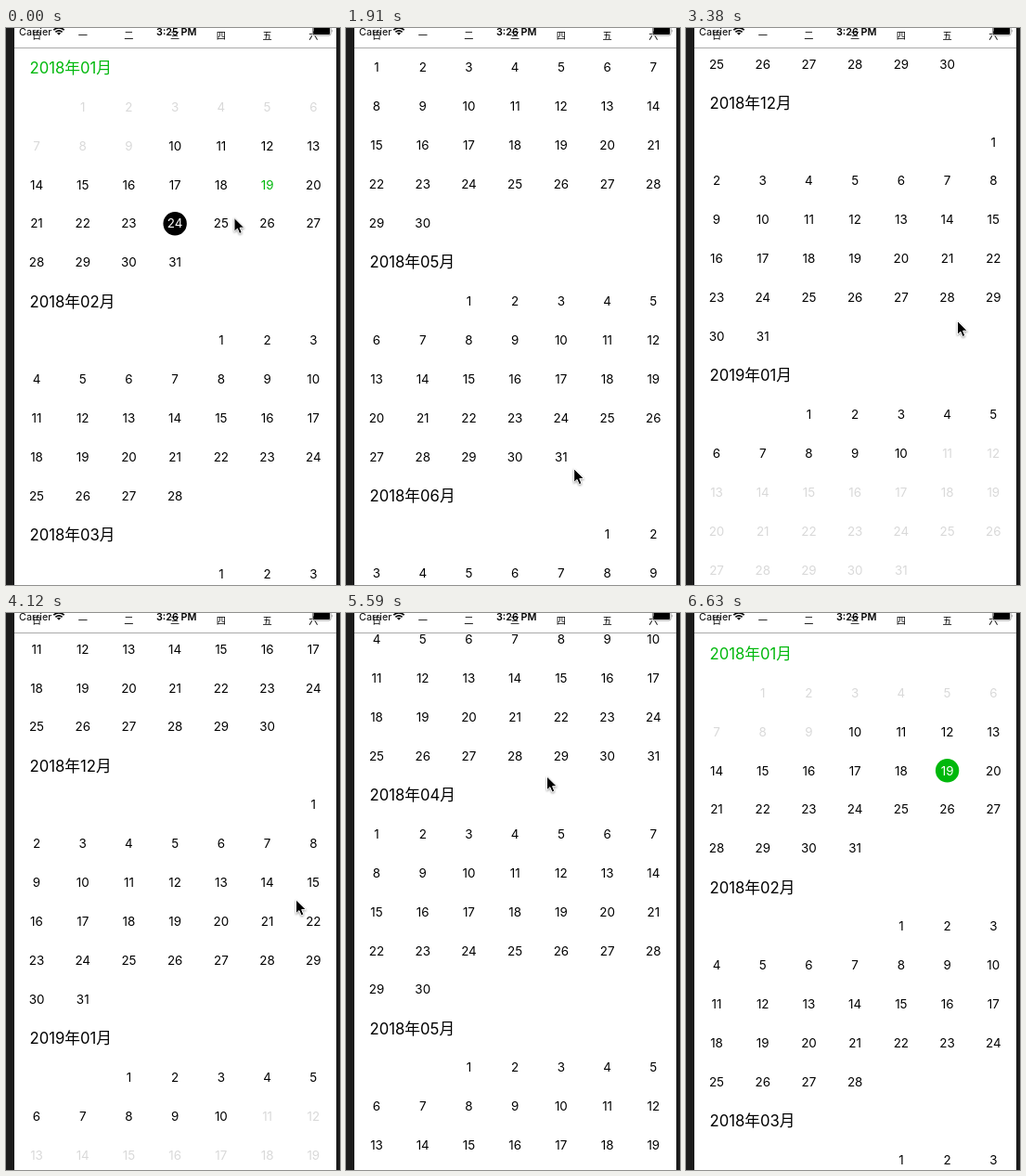
Write an HTML page that moves like this. It is 360x600 px and loops after 6.73 s.

```html
<!DOCTYPE html>
<html lang="zh-CN">
<head>
<meta charset="utf-8">
<title>Calendar</title>
<style>
html, body { margin: 0; width: 100%; height: 100%; overflow: hidden; background: #fff; }
svg { display: block; width: 360px; height: 600px; }
text { font-family: Inter, "Noto Sans CJK SC", "Noto Sans CJK JP", "Noto Sans CJK", sans-serif; fill: #000; }
.day { font-size: 13.4px; text-anchor: middle; }
.month { font-size: 16.7px; }
.week { font-size: 10.2px; text-anchor: middle; }
.bar { font-size: 10.8px; }
.clock { font-weight: 600; text-anchor: middle; }
.off { fill: #d9d9d9; }
.today { fill: #00b80c; }
.on { fill: #fff; }
</style>
</head>
<body>
<svg viewBox="0 0 360 600">
  <defs><clipPath id="clip"><path d="M9 22H356V600H9z"/></clipPath></defs>
  <rect width="360" height="600" fill="#fff"/>
  <g clip-path="url(#clip)"><g id="list"><circle id="dot" r="12.7"/></g></g>
  <path d="M9 21.5H356" stroke="#aaa"/>
  <g id="week"></g>
  <text class="bar" x="14" y="7.7">Carrier</text>
  <g fill="none" stroke="#000" stroke-width="1.7">
    <path d="M51.3 2.2Q57 -2.6 62.7 2.2M53.4 4.4Q57 1.4 60.6 4.4"/>
    <path d="M57 7.8L54.9 5.5Q57 4 59.1 5.5z" fill="#000" stroke="none"/>
  </g>
  <text class="bar clock" id="clock" x="183.7" y="7.7"></text>
  <rect x="330.5" y="-2" width="19.5" height="10" rx="2" fill="none" stroke="#999"/>
  <rect x="331.5" y="-2" width="17.5" height="9" rx="1"/>
  <path d="M351 1.5q1.6 1.3 0 3.4z" fill="#777"/>
  <path d="M0 0H9V600H0zM356 0H360V600H356z" fill="#1b1b1b"/>
  <path id="cursor" d="M0 0V14.8L3.4 11.7 5.6 17 8.3 15.9 6.1 10.7H10.8z" stroke="#fff" stroke-width="1"
        style="filter:drop-shadow(0 1px 1px #0006)"/>
</svg>
<script>
const LOOP = 6730, STEP = 147.33, PITCH = 41.92, TOP = 43;
const $ = id => document.getElementById(id);
const colX = c => 33 + c * 49.72;
const rowY = r => TOP + r * PITCH;

function label(parent, cls, x, y, str) {
  const el = document.createElementNS("http://www.w3.org/2000/svg", "text");
  el.setAttribute("class", cls);
  el.setAttribute("x", x);
  el.setAttribute("y", y);
  el.textContent = str;
  parent.append(el);
  return el;
}

[..."日一二三四五六"].forEach((s, c) => label($("week"), "week", colX(c), 12.2, s));

// Thirteen months, one heading row each, weeks starting on Sunday
const january = {};
let row = 0;
for (let m = 0; m < 13; m++) {
  const year = 2018 + Math.floor(m / 12), month = m % 12;
  const lead = new Date(year, month, 1).getDay();
  const days = new Date(year, month + 1, 0).getDate();
  const title = `${year}年${String(month + 1).padStart(2, "0")}月`;
  label($("list"), m ? "month" : "month today", 25.5, rowY(row) + 6, title);
  for (let d = 1; d <= days; d++) {
    const cell = lead + d - 1, x = colX(cell % 7), y = rowY(row + 1 + Math.floor(cell / 7));
    const off = m === 0 && d < 10 || m === 12 && d > 10;
    const el = label($("list"), off ? "day off" : "day", x, y + 4.8, d);
    if (!m) january[d] = { el, x, y };
  }
  row += 1 + Math.ceil((lead + days) / 7);
}

const speedUp = p => p ** 1.4;
const slowDown = p => 1 - (1 - p) ** 2;
const settle = p => 1 - (1 - p) ** 4;
const smooth = p => p * p * (3 - 2 * p);
const mix = (a, b, p) => a + (b - a) * p;

// Part of the way from step a to step b, 0 to 1
const part = (n, a, b) => Math.min(1, Math.max(0, (n - a) / (b - a)));

function scrollAt(n) {
  const end = 2770.8, back = 2187.4, fast = 601.5, over = -40;
  if (n < 17) return mix(0, 2103, speedUp(part(n, 9, 17)));
  if (n < 26) return mix(2103, end, slowDown(part(n, 17, 23)));
  if (n < 34) return mix(end, back, speedUp(part(n, 26, 34)));
  if (n < 38) return mix(back, fast, speedUp(part(n, 34, 38)));
  if (n < 39) return mix(fast, over, part(n, 38, 39));
  return mix(over, -1, settle(part(n, 39, 45)));
}

// Pointer stops: step, x, y
const stops = [
  [0, 246, 204.5], [5, 281, 168], [8, 280, 207], [12, 250, 520], [17, 208.5, 84.5],
  [23, 292.5, 315.5], [26, 331, 200], [32, 260, 620], [34, 240, 620], [38, 216.5, 176], [40, 214, 620]
];
function pointerAt(n) {
  const i = stops.findIndex(s => s[0] > n);
  if (i < 0) return stops[stops.length - 1].slice(1);
  const [a, ax, ay] = stops[i - 1], [b, bx, by] = stops[i], p = smooth(part(n, a, b));
  return [mix(ax, bx, p), mix(ay, by, p)];
}

function draw(now) {
  // The screen refreshes in even steps
  const n = Math.min(45, Math.floor((now % LOOP + 20) / STEP));
  const tapped = n >= 5, [x, y] = pointerAt(n);
  $("list").setAttribute("transform", `translate(0 ${-scrollAt(n)})`);
  $("cursor").setAttribute("transform", `translate(${x} ${y})`);
  $("clock").textContent = tapped ? "3:26 PM" : "3:25 PM";
  const picked = january[tapped ? 19 : 24];
  $("dot").setAttribute("cx", picked.x);
  $("dot").setAttribute("cy", picked.y);
  $("dot").setAttribute("fill", tapped ? "#00b80c" : "#000");
  january[19].el.setAttribute("class", tapped ? "day on" : "day today");
  january[24].el.setAttribute("class", tapped ? "day" : "day on");
}
function tick() {
  draw(performance.now());
  requestAnimationFrame(tick);
}
tick();
</script>
</body>
</html>
```
